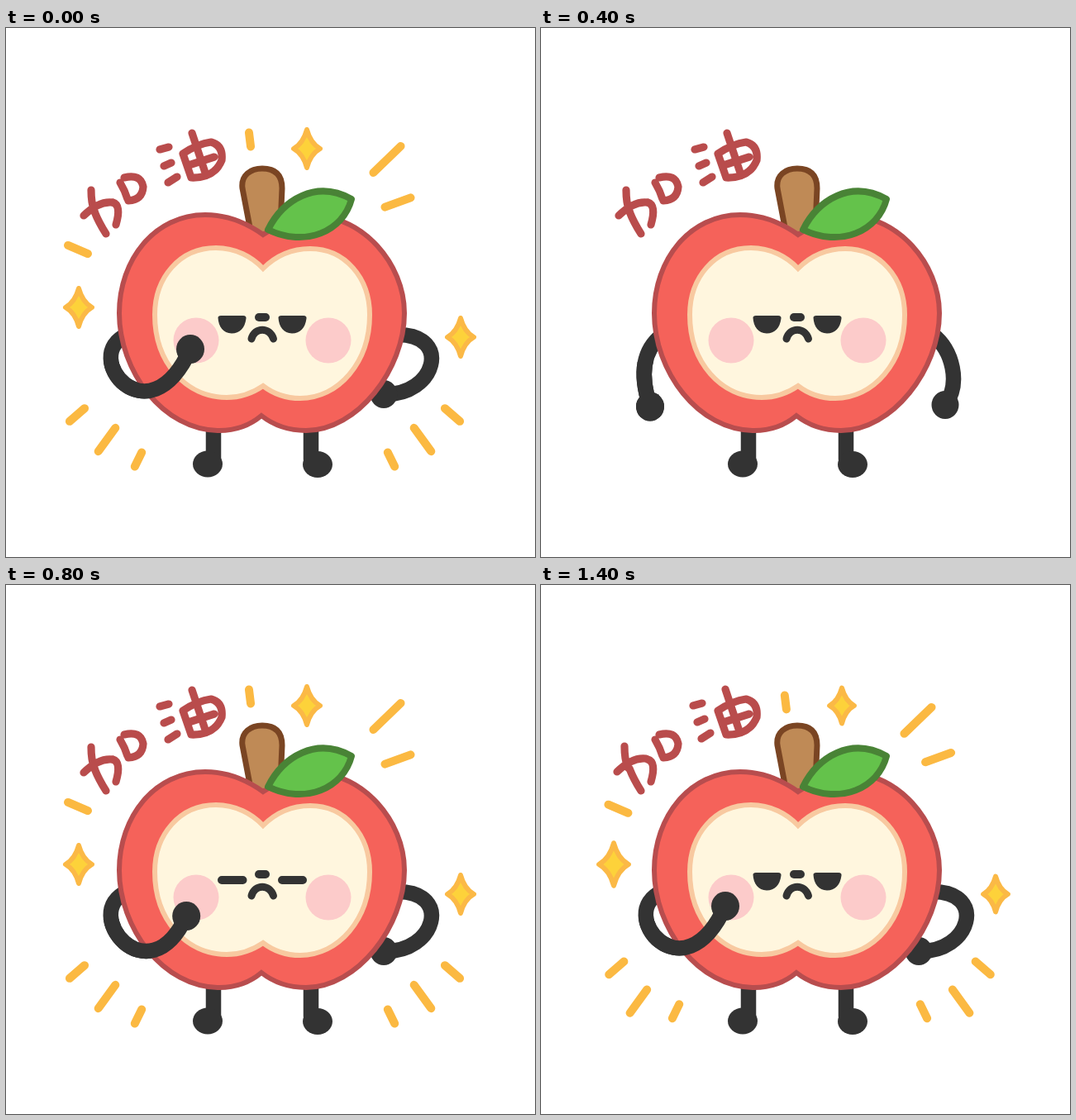
These frames come from a looping animation (640 by 640 pixels, 1.6 s). An HTML page:

```html
<!DOCTYPE html>
<html lang="zh">
<head>
<meta charset="utf-8">
<title>加油</title>
<style>
  html, body { margin: 0; width: 100%; height: 100%; overflow: hidden; background: #fff; }
  svg { display: block; width: 100vw; height: 100vh; }
  .line { fill: none; stroke-linecap: round; stroke-linejoin: round; }
  .ink { stroke: #333; }
  .limb { stroke: #333; stroke-width: 18.5; }
  .dark { fill: #333; }
  .word { stroke: #b94c4c; stroke-width: 9.2; }
  .ray { stroke: #fbb942; stroke-width: 10; }
  .star { fill: #fdd23a; stroke: #fbb946; stroke-width: 6; stroke-linejoin: round; }
</style>
</head>
<body>
<svg viewBox="0 0 640 640" role="img" aria-label="加油">
  <defs>
    <!-- everything but the shoulder, which stays behind the body -->
    <clipPath id="front"><path d="M0 404H165V0H640V640H0Z"/></clipPath>
  </defs>

  <g id="sparks">
    <path class="line ray" id="rays"/>
    <path class="star" id="stars"/>
  </g>

  <g class="line word">
    <path d="M107 222Q112 235 121 249M129 211Q140 214 133 238"/>
    <path d="M138 187Q144 197 147 207M143 181Q163 176 166 192Q165 208 148 209"/>
    <path d="M214 152L224 181Q252 182 261 160Q263 142 248 138Q232 140 214 152M221 166L252 156"/>
    <path id="loose" d="M103 196Q103 212 107 222M94 227Q112 209 129 211M225 127L242 178M186 147L197 144M191 167L200 163M196 187L207 180"/>
  </g>

  <path class="line limb" d="M251 480V522M369 480V522"/>
  <ellipse class="dark" cx="244" cy="527.5" rx="18" ry="16"/>
  <ellipse class="dark" cx="377" cy="528" rx="18" ry="16"/>
  <g id="left">
    <path class="line limb"/>
    <ellipse class="dark" rx="17" ry="17.5"/>
  </g>
  <g id="right">
    <path class="line limb"/>
    <ellipse class="dark" rx="16.5" ry="17"/>
  </g>

  <path d="M299 262L286 194C284 178 296 170 310 170C326 170 334 178 334 194L331 262" fill="#bf8a56" stroke="#7a4523" stroke-width="7"/>
  <path d="M311 250C290 235 268 226 241 226C180 226 137 280 137 345C137 415 190 487 258 487C280 487 296 480 309 469C323 480 340 487 363 487C425 487 482 413 482 345C482 284 430 228 376 228C352 228 332 236 311 250Z" fill="#f5625a" stroke="#b84d4e" stroke-width="6"/>
  <path d="M311 291C298 277 278 266 254 266C210 266 180 302 180 347C180 405 218 447 267 447C284 447 298 442 311 433C324 443 340 448 356 448C402 448 440 405 440 347C440 302 410 267 368 267C344 267 325 277 311 291Z" fill="#fff6de" stroke="#f8c9a0" stroke-width="6"/>
  <path d="M317 244C335 208 375 183 418 207C408 246 362 266 317 244Z" fill="#64c24b" stroke="#498336" stroke-width="8" stroke-linejoin="round"/>

  <g fill="#fccbca">
    <circle cx="230" cy="378" r="27.5"/>
    <circle cx="390" cy="378" r="27.5"/>
  </g>
  <path class="line ink" stroke-width="10" d="M306 350H314"/>
  <path class="line ink" stroke-width="9" d="M297 376C301 361.500 319 361.500 323.500 376"/>
  <g id="open" class="dark">
    <path id="eye" d="M256.500 350.500Q256.500 348 260 348H287Q291 348 290.500 351.500C289 363 283 369.500 273 369.500C263 369.500 257 361 256.500 350.500Z"/>
    <use href="#eye" x="73"/>
  </g>
  <path id="shut" class="line ink" stroke-width="10" d="M261 357H286.500M334 357H359"/>

  <g clip-path="url(#front)"><use href="#left"/></g>
</svg>
<script>
const $ = id => document.getElementById(id);
const show = (id, on) => { $(id).style.display = on ? '' : 'none'; };

// Rays: centre x, y, direction in degrees, length; the last three are mirrored
const MIRROR = 313;
const rays = [
  [87, 268, 203, 26], [295, 135, 83, 17], [461, 159, -44, 46], [474, 211, -20, 33],
  [540, 468, 41, 24], [504, 498, 54, 35], [466, 522, 64, 19]
];
const stars = [[364, 146], [88, 338], [550, 374]];

// On the second beat, neighbouring rays slide in opposite directions
function rayPath([x, y, angle, length], i, beat) {
  const a = angle * Math.PI / 180;
  const slide = beat * (i % 2 ? 7 : -7);
  const point = (d, flip) => {
    const px = x + Math.cos(a) * d;
    return `${flip ? 2 * MIRROR - px : px} ${y + Math.sin(a) * d}`;
  };
  const line = flip => `M${point(slide - length / 2, flip)}L${point(slide + length / 2, flip)}`;
  return line(false) + (i > 3 ? line(true) : '');
}

// Likewise, neighbouring stars grow and shrink
function starPath([x, y], i, beat) {
  const size = 1 + beat * (i % 2 ? 0.12 : -0.07);
  const w = 16 * size, h = 23 * size, a = w * 0.28, b = h * 0.28;
  return `M${x} ${y - h}Q${x + a} ${y - b} ${x + w} ${y}Q${x + a} ${y + b} ${x} ${y + h}` +
         `Q${x - a} ${y + b} ${x - w} ${y}Q${x - a} ${y - b} ${x} ${y - h}Z`;
}

// Each arm: a shoulder and three bends (hanging, swinging, raised),
// each bend being two curve handles and the hand
const arms = {
  left: {
    shoulder: [147, 371],
    bends: [
      [120, 392, 121, 425, 132, 458],
      [108, 400, 116, 455, 187, 456.5],
      [88, 395, 172, 501, 223, 388.5]
    ]
  },
  right: {
    shoulder: [474, 371],
    bends: [
      [498, 390, 508, 430, 489, 456],
      [503, 392, 512, 435, 476.5, 457],
      [540, 371, 520, 445, 457, 443]
    ]
  }
};

function setArm(id, bend, lift) {
  const { shoulder, bends } = arms[id];
  const i = Math.floor(bend), next = bends[Math.ceil(bend)];
  const [a, b, c, d, x, y] = bends[i].map((v, k) => v + (next[k] - v) * (bend - i));
  const hand = [x + lift * 0.4, y - lift];
  const [path, fist] = $(id).children;
  path.setAttribute('d', `M${shoulder}C${[a, b, c, d, ...hand]}`);
  fist.setAttribute('transform', `translate(${hand})`);
}

// start, bend, lift of the left hand
const steps = [
  [0, 2, 0], [400, 0, 0], [500, 0.5, 0], [600, 1, 0],
  [800, 2, -12], [1000, 2, 6], [1200, 2, 0]
];
const LOOP = 1600, BEAT = 200;

function draw(t) {
  const n = Math.floor(t / BEAT), beat = n % 2;
  const [, bend, lift] = steps.findLast(s => s[0] <= t);
  setArm('left', bend, lift);
  setArm('right', bend, 0);
  $('rays').setAttribute('d', rays.map((r, i) => rayPath(r, i, beat)).join(''));
  $('stars').setAttribute('d', stars.map((s, i) => starPath(s, i, beat)).join(''));
  $('loose').setAttribute('transform', `translate(${-2 * beat} ${-beat})`);
  show('sparks', n !== 2);
  show('open', n !== 4);
  show('shut', n === 4);
}

const start = performance.now();
function tick(now) {
  draw(Math.max(0, now - start) % LOOP);
  requestAnimationFrame(tick);
}
tick(start);
</script>
</body>
</html>
```
